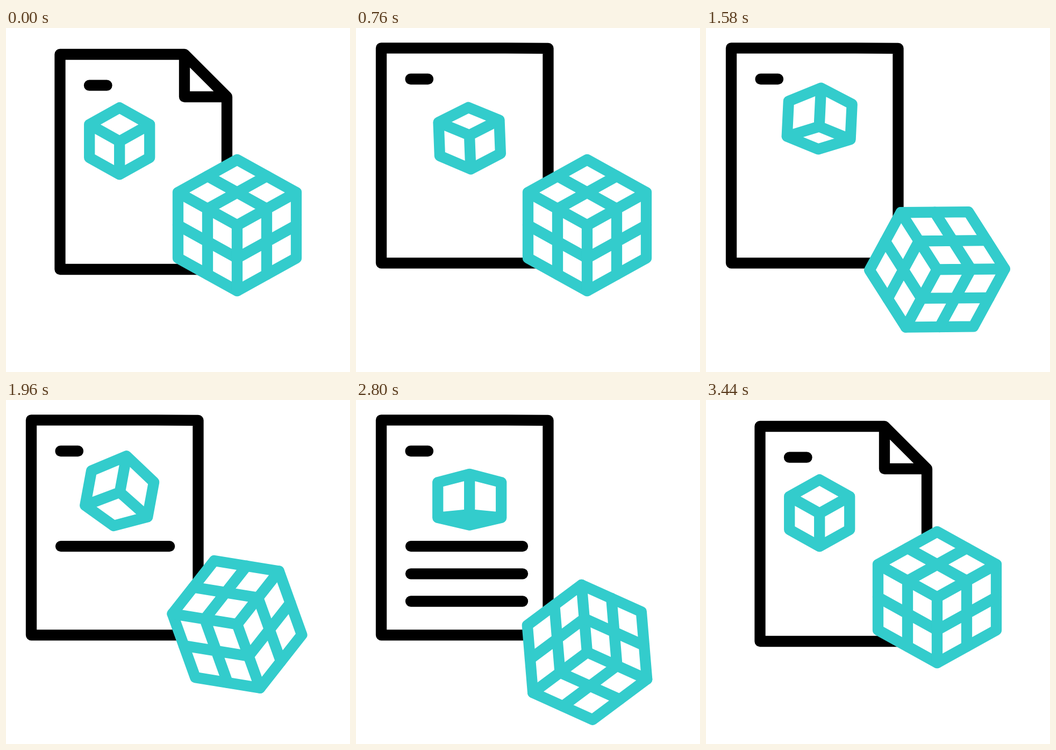
These frames come from a looping animation (640x640 px, 3.6 s). An HTML page with a canvas:

```html
<!DOCTYPE html>
<html lang="en">
<head>
<meta charset="utf-8">
<title>Document and cubes</title>
<style>
html, body { margin: 0; width: 100%; height: 100%; overflow: hidden; background: #fff; }
canvas { display: block; width: 640px; height: 640px; }
</style>
</head>
<body>
<canvas id="stage" width="640" height="640"></canvas>
<script>
const ctx = document.getElementById('stage').getContext('2d');
const LOOP = 3600, STEP = 20;
const TEAL = '#33cccc', BLACK = '#000';

const mix = (a, b, k) => a + (b - a) * k;
const ease = (t, from, to) => {
  const x = Math.min(1, Math.max(0, (t - from) / (to - from)));
  return x * x * (3 - 2 * x);
};

// Keys are [time, value]; the motion rests at every key.
function eased(keys, t) {
  let v = keys[0][1];
  for (let i = 1; i < keys.length; i++) {
    v += (keys[i][1] - keys[i - 1][1]) * ease(t, keys[i - 1][0], keys[i][0]);
  }
  return v;
}

// Keys are [time, value]; the motion flows through inner keys.
function flowing(keys, t) {
  const last = keys.length - 1;
  if (t <= keys[0][0]) return keys[0][1];
  if (t >= keys[last][0]) return keys[last][1];
  const slope = i => i === 0 || i === last ? 0 :
    (keys[i + 1][1] - keys[i - 1][1]) / (keys[i + 1][0] - keys[i - 1][0]);
  let i = 0;
  while (t > keys[i + 1][0]) i++;
  const [t0, a] = keys[i], [t1, b] = keys[i + 1];
  const d = t1 - t0, x = (t - t0) / d, y = 1 - x;
  return a * y * y * (1 + 2 * x) + b * x * x * (3 - 2 * x) +
    d * x * y * (slope(i) * y - slope(i + 1) * x);
}

function trace(points, closed) {
  points.forEach(([x, y], i) => i ? ctx.lineTo(x, y) : ctx.moveTo(x, y));
  if (closed) ctx.closePath();
}

function stroke(color, ...lines) {
  ctx.strokeStyle = color;
  ctx.beginPath();
  lines.forEach(l => trace(l, false));
  ctx.stroke();
}

function drawPage(t) {
  const away = ease(t, 200, 600) - ease(t, 2800, 3400);
  const back = ease(t, 2800, 3400);
  ctx.save();
  ctx.translate(-53.5 * away, -11.7 * away);

  const foldY = mix(128, 49.5, away);
  const notch = [332, 49], side = [411, foldY], inner = [mix(332, 411, away), foldY];
  ctx.strokeStyle = BLACK;
  ctx.beginPath();
  trace([[100.5, 49], notch, side, [411, 449], [100.5, 449]], true);
  trace([notch, inner, side], false);
  ctx.stroke();

  stroke(BLACK, [[155, 106.7], [187.5, 106.7]]);

  for (let i = 0; i < 3; i++) {
    const start = 1600 + 400 * i;
    const len = 208 * (ease(t, start, start + 400) - back);
    const y = 283.8 + 51.2 * i;
    if (len > 0.2) stroke(BLACK, [[155.5, y], [155.5 + len, y]]);
  }
  ctx.restore();
}

const TILT = [[600, -31.3], [1200, 5.5], [1960, 37.1], [2460, 29.7], [2800, 10.5], [3400, -31.3]];
const RISE = [[600, 210.3], [1200, 172.8], [1960, 174.5], [2460, 165.8], [2800, 186], [3400, 210.3]];
const SWAY = [[600, 0], [1200, -12.6], [1860, 12.4], [2440, -12.6], [2800, 0]];

function drawSmallCube(t) {
  const tilt = flowing(TILT, t);
  const depth = ease(t, 600, 1200) - ease(t, 2800, 3400);
  const w = mix(56, 59, depth), h = mix(30.75, 32.8, depth);
  const bulge = (12.4 - 0.26 * Math.abs(tilt)) * depth / 2;
  // heights beyond the side corners, upward positive
  const nearTop = tilt + bulge, nearBottom = tilt - bulge;
  const farTop = mix(-tilt, 8.4 - 0.52 * tilt, depth);
  const farBottom = mix(tilt, 8.4 + 0.52 * tilt, depth);
  const roof = y => [[-w, -h], [0, -h - y], [w, -h]];
  const floor = y => [[-w, h], [0, h - y], [w, h]];

  ctx.save();
  ctx.translate(211.2, flowing(RISE, t));
  ctx.rotate(eased(SWAY, t) * Math.PI / 180);
  const lines = [
    roof(nearTop), floor(nearBottom),
    [[-w, -h], [-w, h]], [[w, -h], [w, h]],
    [[0, -h - nearTop], [0, h - nearBottom]]
  ];
  if (farTop > nearTop) lines.push(roof(farTop));
  if (farBottom > -nearBottom) lines.push(floor(-farBottom));
  stroke(TEAL, ...lines);
  ctx.restore();
}

const DROP = [[1200, 367], [1730, 469.3], [2185, 367], [2800, 469.3], [3400, 367]];

function drawBigCube(t) {
  const axes = [[110, -61], [-110, -61], [0, 122]];
  ctx.save();
  ctx.translate(430, eased(DROP, t));
  ctx.rotate(ease(t, 1200, 3400) * 2 * Math.PI);

  ctx.fillStyle = '#fff';
  ctx.strokeStyle = TEAL;
  ctx.beginPath();
  trace([[0, -122], [110, -61], [110, 61], [0, 122], [-110, 61], [-110, -61]], true);
  ctx.fill();
  ctx.stroke();

  // each face is spanned by two axes from the near corner
  axes.forEach((a, i) => {
    const b = axes[(i + 1) % 3];
    const at = (u, v) => [a[0] * u + b[0] * v, a[1] * u + b[1] * v];
    stroke(TEAL, [at(0, 0), at(1, 0)], [at(0.5, 0), at(0.5, 1)], [at(0, 0.5), at(1, 0.5)]);
  });
  ctx.restore();
}

function draw(now) {
  const t = Math.floor((now % LOOP) / STEP) * STEP;
  ctx.fillStyle = '#fff';
  ctx.fillRect(0, 0, 640, 640);
  ctx.lineWidth = 20.3;
  ctx.lineCap = ctx.lineJoin = 'round';
  drawPage(t);
  drawSmallCube(t);
  drawBigCube(t);
}

const begin = performance.now();
function tick() {
  draw(performance.now() - begin);
  requestAnimationFrame(tick);
}
tick();
</script>
</body>
</html>
```
